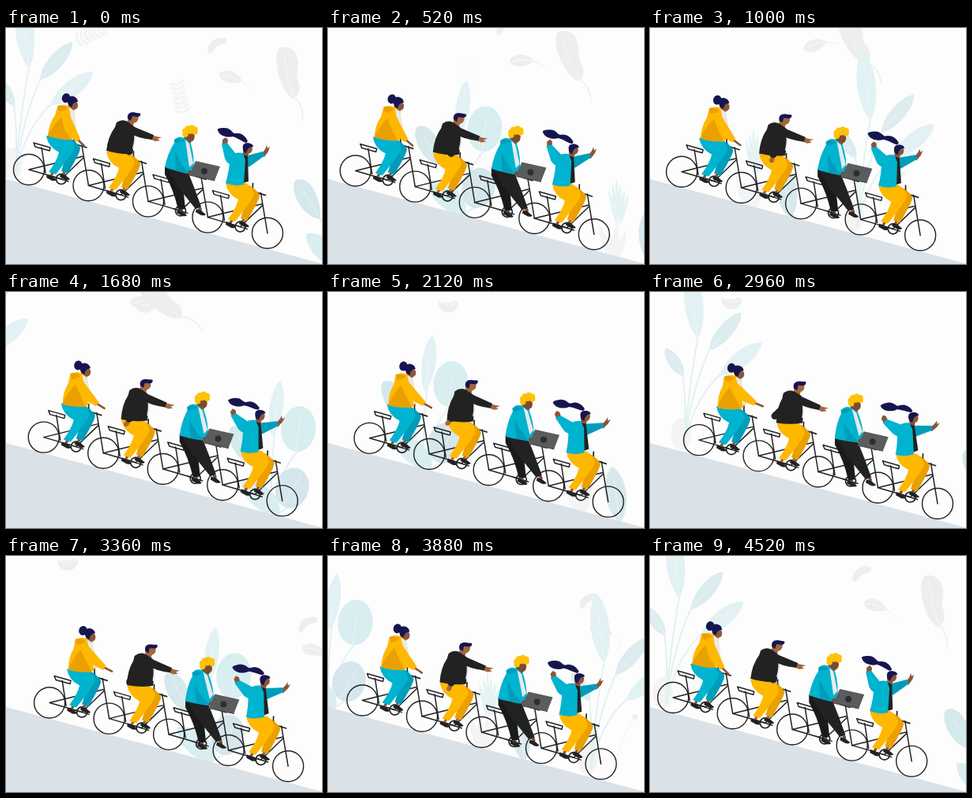
These frames come from a looping animation (400 by 300 pixels, 4.56 s). An HTML page with a canvas:

```html
<!DOCTYPE html>
<html lang="en">
<head>
<meta charset="utf-8">
<title>Downhill riders</title>
<style>
html, body { margin: 0; width: 100%; height: 100%; overflow: hidden; background: #fdfdfd; }
canvas { display: block; width: 400px; height: 300px; }
</style>
</head>
<body>
<canvas id="stage" width="400" height="300"></canvas>
<script>
const g = document.getElementById('stage').getContext('2d');
const LOOP = 4560, SPAN = 4530, PEAK = 3020, SLOPE = 0.267;
const TEAL = '#00b3cf', DEEP = '#009dba', GOLD = '#ffb800', AMBER = '#eaa000', BLACK = '#222', NAVY = '#17154f';
const MIST = '#dcecef', PALE = '#e2f1f3', GREY = '#eeeeef', FAINT = '#f4f4f5';
g.lineCap = g.lineJoin = 'round';

function fill(color, d) {
  g.fillStyle = color;
  g.fill(new Path2D(d));
}
function line(color, width, d) {
  g.strokeStyle = color;
  g.lineWidth = width;
  g.stroke(new Path2D(d));
}
function dot(color, x, y, rx, ry = rx, deg = 0) {
  g.fillStyle = color;
  g.beginPath();
  g.ellipse(x, y, rx, ry, deg * Math.PI / 180, 0, 7);
  g.fill();
}
function at(x, y, draw) {
  g.save();
  g.translate(x, y);
  draw();
  g.restore();
}
function turn(x, y, deg, draw) {
  at(x, y, () => {
    g.rotate(deg * Math.PI / 180);
    g.translate(-x, -y);
    draw();
  });
}

// Leaf from its base (x, y) to its tip, w is the full width
function leaf(color, x, y, tx, ty, w) {
  const dx = tx - x, dy = ty - y, len = Math.hypot(dx, dy);
  const nx = -dy / len * w * 0.68, ny = dx / len * w * 0.68;
  const p = (k, s) => `${x + dx * k + nx * s} ${y + dy * k + ny * s}`;
  fill(color, `M${x} ${y}C${p(.25, 1)} ${p(.8, 1)} ${tx} ${ty}C${p(.8, -1)} ${p(.25, -1)} ${x} ${y}Z`);
  line('#f1f8f9', 0.7, `M${x} ${y}L${p(.8, 0)}`);
}

function tallPlant() {
  line(FAINT, 1.2, 'M293 179Q276 205 268 240');
  dot(GREY, 293, 179, 3.5);
  dot(FAINT, 233, 232, 13, 20);
  for (let i = 0; i < 4; i++) leaf(FAINT, 98 + i * 3, 225, 84 + i * 11, 180 + i % 2 * 9, 8);
  line(PALE, 2, 'M254 110Q243 170 237 245M269 124Q244 180 238 245M284 155Q250 185 237 245M235 158Q240 195 237 245');
  leaf(PALE, 254, 111, 244, 22, 23);
  leaf(MIST, 268, 126, 309, 78, 18);
  leaf(PALE, 282, 158, 335, 116, 20);
  leaf(MIST, 236, 159, 213, 123, 15);
  for (let i = 0; i < 6; i++) leaf(PALE, 106 + i, 180, 96 + i * 5, 122 + Math.abs(i - 2) * 7, 4);
  leaf('#d8e9ed', 153, 236, 143, 164, 26);
}

function broadPlant() {
  line(PALE, 2, 'M258 150Q252 200 252 265M288 178Q262 205 253 262M228 192Q246 215 252 262M280 248L253 265');
  leaf(PALE, 254, 162, 264, 90, 17);
  dot('#d8eef1', 287, 152, 22, 29, 6);
  line('#eef7f8', .8, 'M284 181L289 140');
  fill('#d5e8ec', 'M233 199C208 197 192 158 202 149C220 143 234 170 233 199Z');
  line('#eef7f8', .8, 'M232 196L211 162');
  fill('#d8eef1', 'M262 262C225 260 211 223 216 217C243 215 270 240 262 262Z');
  dot('#d5e7ec', 279, 227, 21, 26, 15);
  line('#eef7f8', .8, 'M268 249L289 212');
}

// Pose [x, y, angle] between timed points, or null outside them
function pose(t, keys) {
  for (let i = 1; i < keys.length; i++) {
    const a = keys[i - 1], b = keys[i];
    if (t < a[0] || t > b[0]) continue;
    const k = (t - a[0]) / (b[0] - a[0]);
    return [1, 2, 3].map(j => a[j] + (b[j] - a[j]) * k);
  }
  return null;
}
function drift(t, keys, draw) {
  const p = pose(t, keys);
  if (p) at(p[0], p[1], () => turn(0, 0, p[2], draw));
}
function pod() {
  fill(GREY, 'M-18 -7C-12 -14 6 -12 11 3C3 6 -17 7 -18 -7Z');
  line(GREY, 1, 'M8 1Q16 6 22 13');
  line('#fafafa', 1, 'M-15 -5Q-2 -6 8 2');
}
function bowl() {
  fill(GREY, 'M-13 -3C-15 16 12 18 13 0C8 -8 5 6 -13 -3Z');
  line('#fafafa', 1, 'M-12 -1Q2 7 11 -1');
}
function bean() {
  fill(GREY, 'M-11 9C-14 -4 2 -13 12 -8C14 0 3 -2 -2 3C-5 7 -7 13 -11 9Z');
}
function feather() {
  fill(GREY, 'M7 35C-10 28 -21 -18 -11 -29C-2 -35 13 -27 13 -10C14 -2 9 4 13 12C17 21 14 31 7 35Z');
  line(GREY, 1.4, 'M-5 -22Q0 18 9 34Q20 45 18 63');
  line('#fafafa', .8, 'M-5 -22Q0 18 9 34');
}
function fern(x, y, deg) {
  turn(x, y, deg, () => {
    line(FAINT, 1, `M${x} ${y + 22}V${y - 22}`);
    for (let i = -3; i < 4; i++)
      for (const s of [-1, 1]) dot(FAINT, x + s * 5, y + i * 6, 5, 2, -s * 30);
  });
}
function floaters(t) {
  drift(t, [[0, 288, 65, 0], [1000, 213, 22, -35], [1680, 176, 14, -20]], pod);
  drift(t, [[1680, 176, 14, 0], [2560, 129, 13, 0], [3360, 78, 6, 0], [3880, 40, -20, 0]], bowl);
  drift(t, [[3100, 415, 134, 0], [3360, 393, 122, 0], [3880, 349, 97, 0], [4530, 288, 65, 0], [LOOP, 288, 65, 0]], pod);
  drift(t, [[0, 267, 22, 0], [1000, 186, -23, 0]], bean);
  drift(t, [[3000, 418, 107, 0], [3880, 330, 57, 0], [4530, 267, 22, 0], [LOOP, 267, 22, 0]], bean);
  drift(t, [[0, 357, 55, 0], [1000, 258, 14, -16], [1680, 195, 10, -38], [2560, 105, -60, -60]], feather);
  drift(t, [[3880, 422, 91, 0], [4530, 357, 55, 0], [LOOP, 357, 55, 0]], feather);
  if (t < 600) {
    g.globalAlpha = 1 - t / 600;
    at(-.08 * t, -.045 * t, () => { fern(108, 8, 65); fern(220, 88, -12); });
    g.globalAlpha = 1;
  }
}

// Local origin of a bike is its rear hub
function bike() {
  line(BLACK, 1.5, 'M6 -34L27 -28L26 -24L8 -29ZM16 -28L21 4M0 0L41 12M0 0L69 -17M41 12L69 -15M67 -31L75.5 20.3');
  line(BLACK, 1.7, 'M57 -43Q56 -34 60 -32L73 -28');
  g.beginPath();
  g.arc(41, 12, 6.5, 0, 7);
  g.stroke();
  line(BLACK, 1.4, 'M31 9L50 15');
}
function wheel(x, y) {
  g.strokeStyle = BLACK;
  g.lineWidth = 1.4;
  g.beginPath();
  g.arc(x, y, 19.5, 0, 7);
  g.stroke();
}
function shoe(x, y) {
  fill(BLACK, `M${x - 6} ${y - 4}L${x} ${y - 2}L${x + 6} ${y + 3}Q${x + 5} ${y + 5} ${x} ${y + 4}L${x - 7} ${y}Z`);
}
function legs(color, shade, skin) {
  line(skin, 3.5, 'M30 4L28 8M45 3L43 7');
  shoe(29, 10);
  shoe(46, 9);
  fill(shade, 'M40 -42L50 -41Q60 -36 65 -28Q66 -23 49 5L41 2L48 -20Z');
  fill(color, 'M22 -43L48 -43Q57 -36 58 -29Q58 -24 34 6L25 3Q36 -12 38 -22Q24 -29 22 -43Z');
}

function rider1(u) {
  at(29, 180, () => legs(TEAL, DEEP, '#8a5539'));
  turn(68, 139, -6.8 * u, () => {
    fill('#8a5539', 'M79 95L87 98L86 107L79 105Z');
    fill(GOLD, 'M65 100Q70 96 79 99L86 105L90 136L82 142Q66 142 53 137Q54 122 62 111Z');
    fill('#e6eaee', 'M80 101L86 105L90 136L85 138Z');
    fill(AMBER, 'M54 134Q64 118 71 113L78 132L82 142Q66 142 53 137ZM65 99Q71 97 78 102Q75 106 67 106Z');
    dot('#8a5539', 87, 98.5, 4.1, 5.2, 10);
    dot(NAVY, 76, 89, 5.2, 6, 20);
    fill(NAVY, 'M79 98Q75 87 84 86.5Q91 88 91 94Q85 93 83 101Z');
    turn(76, 108, -16.5 * u, () => {
      line('#8a5539', 2.6, 'M91 142L99 150');
      fill(GOLD, 'M69 109Q74 102 80 109L94 141L89 145L75 131Z');
    });
  });
}

function rider2(u) {
  at(105, 200, () => legs(GOLD, AMBER, '#a3663f'));
  turn(145, 158, -6.8 * u, () => {
    fill('#a3663f', 'M155 112L164 116L160 126L153 122Z');
    fill(BLACK, 'M140 120Q147 115 154 119L163 126Q164 142 160 160Q144 161 127 156Q129 138 138 126Z');
    line('#e6eaee', 2, 'M162 126Q165 140 161 153');
    dot('#a3663f', 163, 114.5, 4.6, 6, 10);
    fill(NAVY, 'M154 115Q153 107 161 107Q166 108 170 108.5Q171 112 167 113L160 112L158 118Z');
    turn(148, 131, 72 * u, () => {
      if (u > .2 && u < .72) dot('#a3663f', 157, 164, 3, 4);
      line(BLACK, 9, 'M148 131L156 157');
    });
    turn(157, 128, 9 * u, () => {
      fill('#a3663f', 'M183 136L191 138L197 139L192 141L195 143L189 144L182 141Z');
      fill(BLACK, 'M152 124Q156 120 163 126L187 136L185 142Q166 140 155 133Z');
    });
  });
}

function rider3(u) {
  const skin = '#7d4b2c';
  line(skin, 4, 'M222 226L222 232M244 226L246 231');
  shoe(223, 235);
  shoe(247, 234);
  fill('#1a1a1a', 'M201 176L222 180L227 230L218 231Q212 205 201 186Z');
  fill(BLACK, 'M204 178L230 182Q239 204 247 227L240 230L216 200Z');
  turn(213, 180, -6.8 * u, () => {
    fill(skin, 'M226 133L237 138L233 148L225 145Z');
    fill(TEAL, 'M213 142Q219 136 226 140L234 147Q239 164 237 181L229 185Q212 181 201 177Q205 158 213 146Z');
    fill('#e6eaee', 'M227 142L232 147L237 172L232 177Z');
    fill(DEEP, 'M213 142Q219 138 226 143Q221 147 214 146ZM214 157L222 172L230 184L215 181Z');
    dot(skin, 234, 138, 4.8, 6.4);
    for (const [x, y] of [[227, 131], [230, 128], [235, 127], [239, 129], [239, 132], [227, 135], [233, 131]])
      dot('#ffc20a', x, y, 3.7);
    dot(skin, 234, 184, 4, 3, 25);
  });
  at(-2.3 * u, 0, () => {
    fill('#5b5c5e', 'M240 169L271 176L264 194L232 187Z');
    line('#454648', 1, 'M232 187L264 194');
    dot('#2d2e30', 251, 182, 4);
  });
}

function rider4(u) {
  const skin = '#8a5539';
  at(256, 240, () => legs(GOLD, AMBER, skin));
  turn(291, 199, -6.8 * u, () => {
    turn(304, 145, -7 * u, () =>
      fill(NAVY, 'M306 144C303 136 296 133 291 134C286 135 286 127 276 127C270 127 267 128 268 130C270 137 280 140 287 138C294 140 298 144 304 146Z'));
    turn(303, 168, 22 * u, () => {
      fill(skin, 'M323 161L328 154L330 149L331 153L334 151L332 157L327 164Z');
      fill(DEEP, 'M302 163L325 157L328 162L307 177Z');
    });
    fill(skin, 'M300 152L309 154L306 164L300 162Z');
    fill(BLACK, 'M297 160L306 163L307 195L297 198Z');
    fill(TEAL, 'M285 162Q291 157 300 159L303 168L301 199Q289 202 278 197Q283 180 283 168Z');
    dot(skin, 307.5, 154, 4.4, 5.6, 10);
    fill(NAVY, 'M300 155Q298 146 306 146Q313 147 313 151Q306 150 304 159Q301 158 300 155Z');
    turn(288, 166, -25 * u, () => {
      fill(skin, 'M274 148L274 142L278 139L281 142L280 149Z');
      fill(TEAL, 'M273 147L280 146L291 160L289 174Q281 175 277 166Z');
    });
  });
}

function draw(now) {
  const t = now % LOOP;
  g.fillStyle = '#fdfdfd';
  g.fillRect(0, 0, 400, 300);
  floaters(t);
  for (let n = -1; n < 4; n++) {
    const x = 18 + n * 738 - .488 * t;
    at(x - 243, (x - 243) * SLOPE, tallPlant);
    at(x + 147, (x + 147) * SLOPE, broadPlant);
  }
  fill('#dae1e7', 'M0 192L400 299.5V300H0Z');

  const u = t < PEAK ? t / PEAK : Math.max(0, (SPAN - t) / (SPAN - PEAK));
  at(33.7 * u, 8.3 * u, () => {
    for (let i = 0; i < 5; i++) wheel(29 + 75.5 * i, 180 + 20.2 * i);
    [rider1, rider2, rider3, rider4].forEach((rider, i) => {
      at(29 + 75.5 * i, 180 + 20.2 * i, bike);
      rider(u);
    });
  });
}

let start;
function tick(now) {
  start ??= now;
  draw(now - start);
  requestAnimationFrame(tick);
}
draw(0);
requestAnimationFrame(tick);
</script>
</body>
</html>
```
